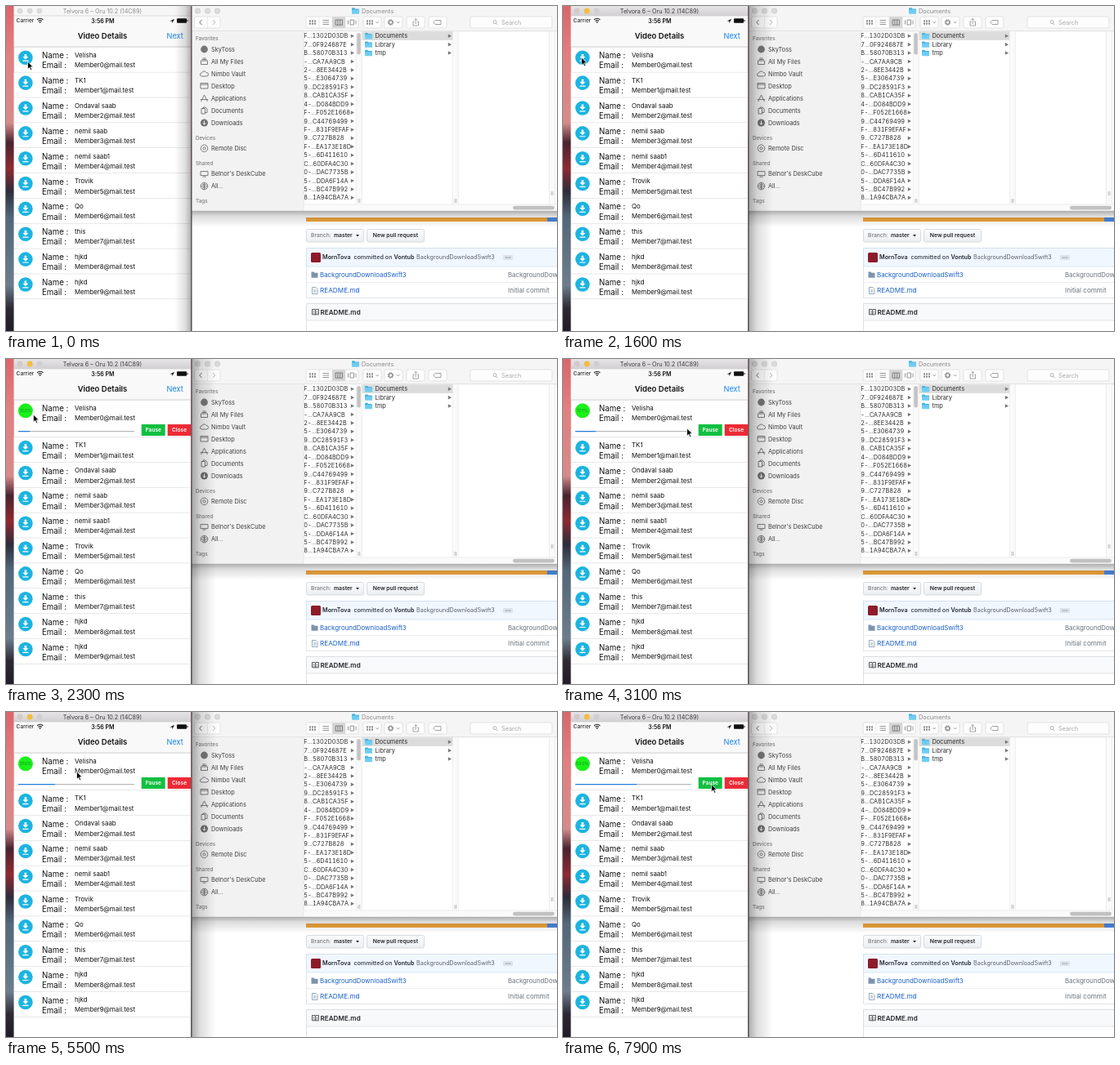
Write an HTML page that moves like this. It is 674 px wide and 398 px high and loops after 8000 ms.

```html
<!DOCTYPE html>
<html lang="en">
<head>
<meta charset="utf-8">
<title>Background downloads</title>
<style>
  html, body { margin: 0; width: 100%; height: 100%; overflow: hidden; background: #fff; }
  svg { display: block; width: 100vw; height: 100vh; }
  text { font-family: Inter, Roboto, "Liberation Sans", sans-serif; white-space: pre; }
  .hex { font-variant-numeric: tabular-nums; }
</style>
</head>
<body>
<svg id="stage" viewBox="0 0 674 398" preserveAspectRatio="none">
  <defs>
    <linearGradient id="wall" x1="0" y1="0" x2="0" y2="1">
      <stop offset="0" stop-color="#d9666c"/>
      <stop offset=".15" stop-color="#e27f80"/>
      <stop offset=".36" stop-color="#d58b8a"/>
      <stop offset=".42" stop-color="#4a2230"/>
      <stop offset=".5" stop-color="#8e2a32"/>
      <stop offset=".57" stop-color="#2e2c3b"/>
      <stop offset=".65" stop-color="#52677a"/>
      <stop offset=".86" stop-color="#6c7d8d"/>
      <stop offset=".93" stop-color="#2d2833"/>
      <stop offset="1" stop-color="#221c28"/>
    </linearGradient>
    <linearGradient id="bar" x1="0" y1="0" x2="0" y2="1">
      <stop offset="0" stop-color="#e6e4e6"/>
      <stop offset="1" stop-color="#d2d0d2"/>
    </linearGradient>
    <linearGradient id="drop" x1="0" y1="0" x2="0" y2="1">
      <stop offset="0" stop-color="#000" stop-opacity=".32"/>
      <stop offset=".3" stop-color="#000" stop-opacity=".14"/>
      <stop offset="1" stop-color="#000" stop-opacity="0"/>
    </linearGradient>
    <linearGradient id="side">
      <stop offset="0" stop-color="#000" stop-opacity=".32"/>
      <stop offset=".35" stop-color="#000" stop-opacity=".13"/>
      <stop offset="1" stop-color="#000" stop-opacity="0"/>
    </linearGradient>
    <linearGradient id="btn" x1="0" y1="0" x2="0" y2="1">
      <stop offset="0" stop-color="#fafbfc"/>
      <stop offset="1" stop-color="#eceff2"/>
    </linearGradient>
    <clipPath id="hexClip"><rect x="364.5" y="31" width="64" height="212"/></clipPath>
    <clipPath id="phoneClip"><rect x="9.5" y="0" width="217" height="398"/></clipPath>
  </defs>
</svg>
<script>
const NS = 'http://www.w3.org/2000/svg';
const stage = document.getElementById('stage');

function add(parent, tag, attrs) {
  const el = document.createElementNS(NS, tag);
  for (const k in attrs) el.setAttribute(k, attrs[k]);
  parent.appendChild(el);
  return el;
}
const group = (parent, attrs = {}) => add(parent, 'g', attrs);
const rect = (p, x, y, width, height, fill, more = {}) =>
  add(p, 'rect', { x, y, width, height, fill, ...more });
const dot = (p, cx, cy, r, fill, more = {}) => add(p, 'circle', { cx, cy, r, fill, ...more });
const path = (p, d, stroke, width = 1, fill = 'none') =>
  add(p, 'path', { d, stroke, 'stroke-width': width, fill });
// y is the middle of the capitals
function text(p, str, x, y, size, fill = '#222', weight = 400, anchor = 'start', more = {}) {
  const el = add(p, 'text', {
    x, y: y + size * 0.36, 'font-size': size, fill, 'font-weight': weight, 'text-anchor': anchor, ...more
  });
  el.textContent = str;
  return el;
}
function folder(p, x, y, s = 1) {
  const g = group(p, { transform: `translate(${x} ${y}) scale(${s})` });
  path(g, 'M0 1Q0 0 1 0H3.6L4.6 1.2H8.5Q9.5 1.2 9.5 2.2V7H0Z', 'none', 0, '#46b4e0');
  rect(g, 0, 2.4, 9.5, 5.4, '#6fcdf2', { rx: 0.7 });
}

function drawPage(p) {
  rect(p, 227, 240, 447, 158, '#fff');
  rect(p, 367, 259, 295, 5, '#f0a43c');
  rect(p, 662, 259, 12, 5, '#4a87e0');

  for (const x of [367.5, 441.5])
    rect(p, x, 273.5, 70, 15.5, 'url(#btn)', { rx: 2, stroke: '#cfd2d5', 'stroke-width': 0.8 });
  text(p, 'Branch:', 373, 281, 6.8, '#666');
  text(p, 'master', 401, 281, 6.8, '#24292e', 600);
  path(p, 'M428 280h4l-2 2.4z', 'none', 0, '#24292e');
  text(p, 'New pull request', 476.5, 281, 6.8, '#24292e', 600, 'middle');

  rect(p, 367.5, 296.5, 310, 61, '#fff', { stroke: '#d9dee4', 'stroke-width': 0.8 });
  rect(p, 367.5, 296.5, 310, 22.5, '#f0f7ff', { stroke: '#cfe0f2', 'stroke-width': 0.8 });
  rect(p, 373, 302, 12, 12, '#8e1b2a', { rx: 1.5 });
  text(p, 'MornTova', 387, 307.5, 7.2, '#24292e', 600);
  text(p, 'committed on', 472.5, 307.5, 7.2, '#33393f', 500, 'end');
  text(p, 'Vontub', 499.5, 307.5, 7.2, '#24292e', 600, 'end');
  text(p, 'BackgroundDownloadSwift3', 502, 307.5, 7.15, '#586069');
  rect(p, 608, 305, 12, 6, '#dde3e9', { rx: 1 });
  for (let i = 0; i < 3; i++) dot(p, 611.7 + i * 2.3, 308, 0.6, '#444d56');

  path(p, 'M368 338.5H674', '#e6e9ec', 0.8);
  path(p, 'M373.5 325.5h3l1 1.2h4v6h-8z', 'none', 0, '#7d94ae');
  path(p, 'M374.5 344.5h4.5l2 2v6h-6.5zM376 348h3.4M376 350h3.4', '#7d94ae', 0.8);
  text(p, 'BackgroundDownloadSwift3', 384, 329, 7.9, '#1a5fc8');
  text(p, 'README.md', 384, 348.3, 8.2, '#1a5fc8');
  text(p, 'BackgroundDownloadSwift3', 614, 329, 7.8, '#6a737d');
  text(p, 'Initial commit', 614, 348.3, 8.1, '#6a737d');

  rect(p, 367.5, 364.5, 310, 40, '#fff', { stroke: '#d9dcdf', 'stroke-width': 0.8 });
  rect(p, 367.5, 364.5, 310, 20.5, '#f8f9fa', { stroke: '#d9dcdf', 'stroke-width': 0.8 });
  path(p, 'M374.5 371.5h3.5l.5.6.5-.6h3.5v6.3h-3.5l-.5.5-.5-.5h-3.5zM378.5 372v6M375.8 374h1.6M375.8 376h1.6M379.7 374h1.6M379.7 376h1.6', '#333', 0.8);
  text(p, 'README.md', 384.5, 375, 8.1, '#24292e', 600);
}

const hexNames = ['F...1302D03DB', '7...0F924687E', 'B...58070B313', '-...CA7AA9CB', '2-...8EE3442B',
  '5-...E3064739', '9...DC28591F3', '8...CAB1CA35F', '4-...D084BDD9', 'F-...F052E1668',
  '9...C44769499', 'F-...831F9EFAF', '9...C727B828', 'F-...EA173E18D', '5-...6D411610',
  'C...60DFA4C30', '0-...DAC7735B', '5-...DDA6F14A', '5-...BC47B992', '8...1A94CBA7A'];

function drawToolbar(p) {
  rect(p, 227, 0, 447, 31, '#f5f5f5');
  path(p, 'M227 30.7H674', '#d6d6d6', 0.7);
  for (const x of [234.5, 246.5, 258.5]) dot(p, x, 6, 3.4, '#dadada', { stroke: '#cbcbcb', 'stroke-width': 0.5 });
  folder(p, 423, 2.3, 0.95);
  text(p, 'Documents', 435, 6.2, 7.3, '#8a8a8a');

  const box = (x, w) => rect(p, x, 13, w, 14, '#fdfdfd', { rx: 2.2, stroke: '#d9d9d9', 'stroke-width': 0.7 });
  box(230.5, 31.5); box(367, 64); box(437, 22); box(463, 22); box(490, 22); box(517, 22); box(568, 100);
  rect(p, 399, 13.3, 16, 13.4, '#d4d4d4');
  path(p, 'M246.3 13V27M383 13V27M399 13V27M415 13V27', '#dedede', 0.7);
  path(p, 'M239.5 17l-2.8 3 2.8 3', '#6b6b6b', 1);
  path(p, 'M253 17l2.8 3-2.8 3', '#b4b4b4', 1);

  const ink = '#8c8c8c';
  const grid = x => {
    for (let i = 0; i < 6; i++) rect(p, x + (i % 3) * 3, 17.3 + (i > 2 ? 3.2 : 0), 2, 2.2, ink);
  };
  grid(371);
  grid(441);
  path(p, 'M387.5 17.5h7.5M387.5 20h7.5M387.5 22.5h7.5', ink, 0.9);
  path(p, 'M403 17h8.5v6.2h-8.5zM405.8 17v6.2M408.7 17v6.2', '#6d6d6d', 0.8);
  path(p, 'M421 17h4.5v6h-4.5zM418.5 17.5v5M428 17.5v5', ink, 0.9);
  path(p, 'M452.5 19.2l1.7 1.7 1.7-1.7M478 19.2l1.7 1.7 1.7-1.7', ink, 0.9);
  dot(p, 470.5, 20, 2.3, 'none', { stroke: ink, 'stroke-width': 1.3 });
  dot(p, 470.5, 20, 3.4, 'none', { stroke: ink, 'stroke-width': 1, 'stroke-dasharray': '1.3 1.37' });
  path(p, 'M499.5 19h-1.5v5h6.5v-5h-1.5M501.2 22v-6.5M499.6 17l1.6-1.6 1.6 1.6', ink, 0.8);
  path(p, 'M525 17.5h7v5h-7l-2.3-2.5z', ink, 0.8);
  dot(p, 598, 19.6, 2, 'none', { stroke: '#a0a0a0', 'stroke-width': 0.8 });
  path(p, 'M599.5 21.2l2 2', '#a0a0a0', 0.8);
  text(p, 'Search', 606, 20.2, 7.3, '#a8a8a8');
}

function drawSidebar(p) {
  rect(p, 227, 31, 137, 220, '#f3f2f3');
  for (const [label, y] of [['Favorites', 40], ['Devices', 161.3], ['Shared', 192.5], ['Tags', 239]])
    text(p, label, 232, y, 6.3, '#7c7c7c', 500);

  const ink = '#6f6f6f';
  const line = (y, d) => path(group(p, { transform: `translate(242.5 ${y})` }), d, ink, 0.9);
  const ring = (y, r) => dot(p, 242.5, y, r, 'none', { stroke: ink, 'stroke-width': 0.9 });
  const items = [['SkyToss', 53, ''], ['All My Files', 68, 'M-4-1h8v4.5h-8zM-3-2.5h6M-2-4h4'],
    ['Nimbo Vault', 83, 'M-3 3a2 2 0 0 1 0-4a3 3 0 0 1 5.5-.5a2.2 2.2 0 0 1 .5 4.5z'],
    ['Desktop', 98, 'M-4.5-3.5h9v6.5h-9zM-4.5-1.8h9'],
    ['Applications', 113, 'M-4 4L0-4L4 4M-4.8 1.5H4.8'],
    ['Documents', 128, 'M-3.5-2.5h4.5v6.5h-4.5zM-1.5-2.5v-1.5h3l2 2v4.5h-2.5'],
    ['Downloads', 143, ''], ['Remote Disc', 174.3, ''],
    ["Belnor's DeskCube", 205.6, 'M-4.5-3h9v5h-9zM-2 3.5h4'],
    ['All...', 220.6, 'M-4 0h8M0-4v8M-2.8-2.5q2.8 1.5 5.6 0M-2.8 2.5q2.8-1.5 5.6 0']];
  for (const [label, y, d] of items) {
    if (d) line(y, d);
    text(p, label, 251, y, 7.35, '#3f3f3f');
  }
  dot(p, 242.5, 53, 4.4, '#777');
  dot(p, 242.5, 143, 4.5, ink);
  path(p, 'M242.5 140.5v4.5M240.6 143.3l1.9 1.9 1.9-1.9', '#f3f2f3', 1);
  ring(174.3, 4.3);
  ring(174.3, 1.6);
  ring(220.6, 4.3);
}

function drawFinder(p) {
  rect(p, 227, 251, 447, 20, 'url(#drop)');
  rect(p, 227, 0, 447, 251, '#fff');
  drawToolbar(p);
  drawSidebar(p);
  path(p, 'M364.3 31V251', '#dcdcdc', 0.7);

  const arrow = (x, y, fill = '#777') => path(p, `M${x} ${y - 2.3}l4.2 2.3l-4.2 2.3z`, 'none', 0, fill);
  const names = group(p, { 'clip-path': 'url(#hexClip)' });
  hexNames.forEach((name, i) => {
    const y = 36.7 + i * 10.43;
    text(names, name, 364.3, y, 7.3, '#2c2c2c', 400, 'start', { class: 'hex' });
    arrow(421.8, y);
  });

  for (const x of [428.3, 546.3, 664.5]) {
    rect(p, x, 31, 7, 212, '#fafafa');
    path(p, `M${x} 31V243M${x + 7} 31V243`, '#e3e3e3', 0.6);
    const y = x > 600 ? 227 : 236;
    path(p, `M${x + 2.7} ${y}v5M${x + 4.5} ${y}v5`, '#a5a5a5', 0.7);
  }
  rect(p, 429.3, 33, 4.6, 26.5, '#c4c4c4', { rx: 2.3 });

  rect(p, 435.6, 31.3, 110.7, 10.6, '#dcdcdc');
  ['Documents', 'Library', 'tmp'].forEach((name, i) => {
    const y = 36.7 + i * 10.43;
    folder(p, 439, y - 3.7, 0.95);
    text(p, name, 451.5, y, 7.35, '#2c2c2c');
    arrow(540.8, y);
  });

  rect(p, 364.6, 243, 309.4, 8, '#fafafa');
  path(p, 'M364.6 243H674', '#e3e3e3', 0.6);
  rect(p, 620, 244.7, 51, 4.7, '#c1c1c1', { rx: 2.3 });
  path(p, 'M227 251.2H674', '#b5b5b5', 0.7);
}

const people = ['Velisha', 'TK1', 'Ondaval saab', 'nemil saab', 'nemil saab1', 'Trovik', 'Qo', 'this', 'hjkd', 'hjkd'];
const TOP = 50.3, ROW = 30.85;

function drawRow(p, i) {
  const y = TOP + i * ROW;
  text(p, 'Name :', 44, y + 10.6, 9.7, '#111');
  text(p, 'Email :', 44, y + 22.7, 9.7, '#111');
  text(p, people[i], 84, y + 10, 7.9, '#111');
  text(p, `Member${i}@mail.test`, 84, y + 22.2, 7.8, '#111');
  const icon = group(p, { transform: `translate(23.9 ${y + 13})` });
  dot(icon, 0, 0, 8.8, '#1cb4e0');
  path(icon, 'M-1.3-4.4h2.6v3.2h2.2L0 2.3L-3.5-1.2h2.2zM-3.5 3.3h7v1.2h-7z', 'none', 0, '#fff');
  return icon;
}

function drawPhone(p) {
  rect(p, 9.5, 0, 217, 398, '#fff');
  const ui = {};

  // first row with its download controls
  ui.icon = drawRow(p, 0);
  ui.open = group(p);
  ui.ring = dot(ui.open, 23.9, 63.3, 9, '#1cf01c');
  ui.pct = text(ui.open, '', 23.9, 63.3, 5, '#0b8a14', 400, 'middle');
  ui.track = rect(ui.open, 15, 88, 142, 1.2, '#b7b7b7');
  ui.fill = rect(ui.open, 15, 88, 0, 1.2, '#1f7fe0');
  rect(ui.open, 165.7, 80, 29, 14, '#12bf42');
  rect(ui.open, 197.7, 80, 28.8, 14, '#ec2b36');
  ui.label = text(ui.open, 'Pause', 180.2, 87, 6.6, '#fff', 600, 'middle');
  text(ui.open, 'Close', 212, 87, 6.6, '#fff', 600, 'middle');

  ui.rest = group(p);
  rect(ui.rest, 9.5, TOP + ROW, 217, 330, '#fff');
  for (let i = 1; i < people.length; i++) drawRow(ui.rest, i);
  for (let i = 1; i <= people.length; i++)
    rect(ui.rest, 9.5, TOP + i * ROW - 0.3, 217, 0.6, '#d9d9dc');

  // status and navigation bars
  rect(p, 9.5, 12, 217, 38, '#f9f9f9');
  rect(p, 9.5, 49.7, 217, 0.7, '#b9b9bb');
  text(p, 'Carrier', 12.5, 18, 6.7, '#111');
  path(p, 'M38 16.8q3.7-3 7.4 0M39.5 18.4q2.2-1.7 4.4 0', '#111', 1.1);
  path(p, 'M40.5 19.5q1.2-.9 2.4 0l-1.2 1.4z', 'none', 0, '#111');
  text(p, '3:56 PM', 118.3, 18, 7, '#111', 600, 'middle');
  path(p, 'M200.5 18.5l5.5-2.7-2.7 5.5v-2.8z', 'none', 0, '#111');
  rect(p, 209, 15.2, 12, 5.6, '#111', { rx: 1 });
  rect(p, 221.5, 17, 1, 2, '#111');
  text(p, 'Video Details', 118, 36.7, 9.5, '#111', 600, 'middle');
  text(p, 'Next', 196.5, 36.7, 9.2, '#1583f0');

  ui.bar = rect(p, 9.5, 0, 217, 12, '#f6f6f6');
  rect(p, 9.5, 11.7, 217, 0.6, '#c9c9c9');
  ui.lights = [17, 29.2, 41].map(x => dot(p, x, 6, 3.4, '#dadada'));
  ui.title = text(p, 'Telvora 6 – Oru 10.2 (14C89)', 118, 6.2, 7.2, '#8d8d8d', 400, 'middle');
  return ui;
}

rect(stage, 0, 0, 674, 398, 'url(#wall)');
drawPage(group(stage));
drawFinder(group(stage));
const ui = drawPhone(group(stage, { 'clip-path': 'url(#phoneClip)' }));
// the front window casts its shadow on the other one
ui.shadeRight = rect(stage, 227, 0, 30, 398, 'url(#side)');
ui.shadeLeft = rect(stage, -226.5, 0, 20, 398, 'url(#side)', { transform: 'scale(-1 1)' });
rect(stage, 226.3, 0, 1.2, 398, '#4a4448');
const cursor = path(stage, 'M0 0V9.3L2.2 7.3L3.7 10.7L5.2 10L3.7 6.7H6.6Z', '#fff', 0.7, '#000');

// Linear track through [time, value] keys
function track(keys, t) {
  const i = keys.findIndex(k => k[0] > t);
  if (i < 0) return keys[keys.length - 1][1];
  if (i === 0) return keys[0][1];
  const [t0, a] = keys[i - 1], [t1, b] = keys[i];
  return a + (b - a) * (t - t0) / (t1 - t0);
}

const LOOP = 8000, STEP = 100;
const ACTIVE = 900, OPEN = 1700, PAUSED = 3500, RESUMED = 4800;
const shiftKeys = [[1600, 0], [1700, 3], [1800, 9.1], [1900, 13], [2000, 14.5]];
const percentKeys = [[1700, 0], [1800, 0.4], [2300, 10], [3500, 21.6], [4800, 21.6], [5500, 31.6],
  [6800, 43.5], [6900, 43.5], [7900, 53]];
const xKeys = [[0, 26.5], [600, 22.5], [1600, 22.5], [1800, 26.5], [2300, 33.5], [2700, 70], [3200, 172],
  [3600, 174], [4100, 79], [4200, 149], [4300, 149], [4500, 174], [4800, 175], [5500, 86.5], [6900, 88], [7700, 181.5]];
const yKeys = [[0, 68], [600, 63], [1600, 63], [1800, 64], [2300, 68], [3200, 87],
  [3600, 87], [4100, 76], [4200, 86], [4800, 87], [5500, 73], [6900, 74], [7700, 88.5]];

const show = (el, on) => el.setAttribute('visibility', on ? 'visible' : 'hidden');

function draw(now) {
  const t = Math.floor(now % LOOP / STEP) * STEP;
  const active = t >= ACTIVE, open = t >= OPEN;
  const paused = t >= PAUSED && t < RESUMED;
  const pct = track(percentKeys, t);

  ui.bar.setAttribute('fill', active ? 'url(#bar)' : '#f6f6f6');
  ui.title.setAttribute('fill', active ? '#3c3c3c' : '#8d8d8d');
  ['#d3c9c9', '#f5bd3c', '#cfcfcf'].forEach((c, i) => ui.lights[i].setAttribute('fill', active ? c : '#dadada'));
  show(ui.shadeRight, active);
  show(ui.shadeLeft, !active);

  show(ui.icon, !open);
  show(ui.open, open);
  ui.rest.setAttribute('transform', `translate(0 ${track(shiftKeys, t)})`);
  ui.ring.setAttribute('fill', paused ? '#a0a0a0' : '#1cf01c');
  ui.pct.setAttribute('fill', paused ? '#4a4a4a' : '#0b8a14');
  ui.pct.textContent = pct.toFixed(1) + '%';
  ui.track.setAttribute('fill', t < 2000 ? '#4c4c4c' : '#b7b7b7');
  ui.fill.setAttribute('width', 1.42 * pct);
  ui.label.textContent = paused ? 'Resume' : 'Pause';
  cursor.setAttribute('transform', `translate(${track(xKeys, t)} ${track(yKeys, t)})`);
}

const start = performance.now();
function tick() {
  draw(performance.now() - start);
  requestAnimationFrame(tick);
}
tick();
</script>
</body>
</html>
```
